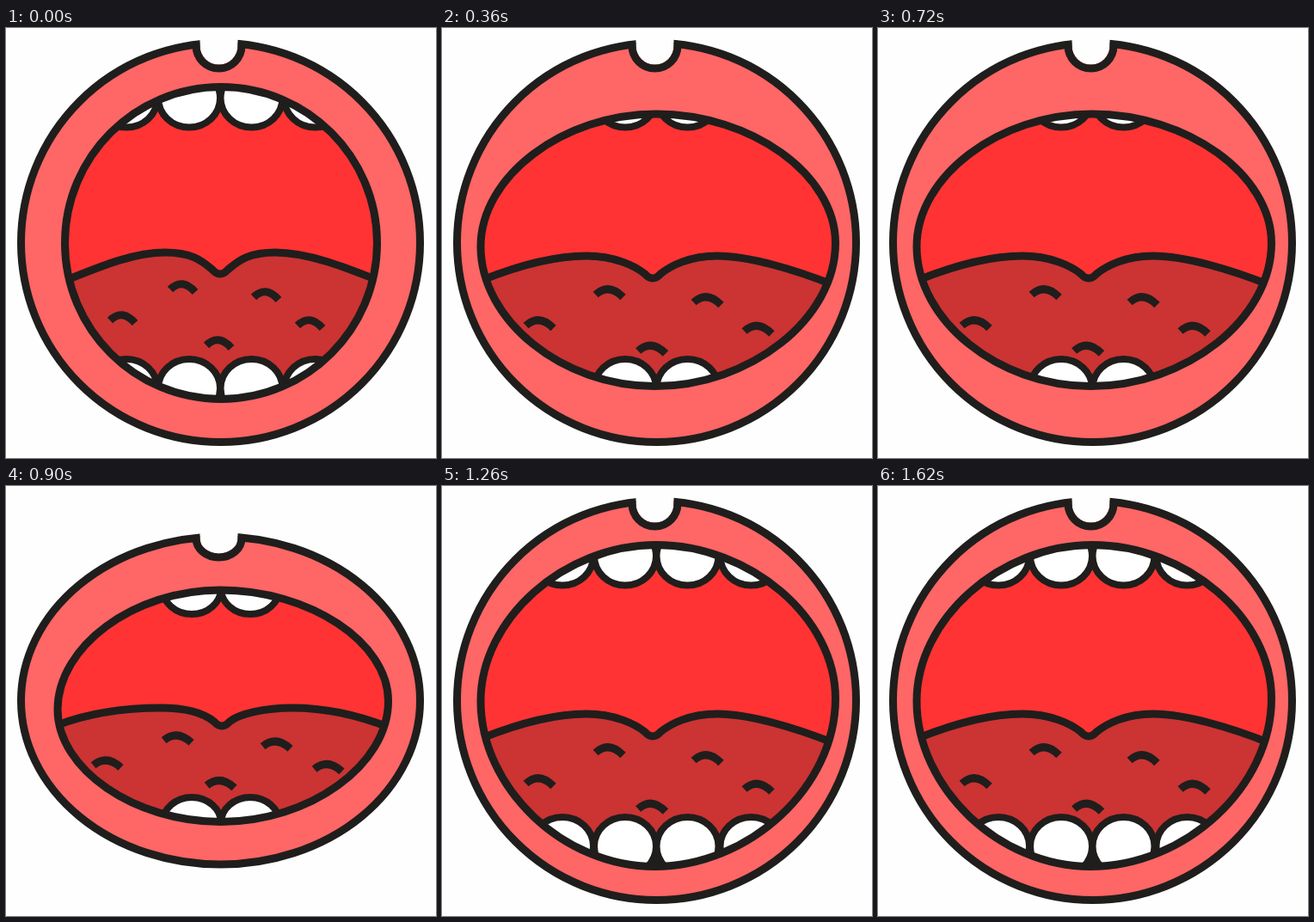
An HTML page that plays this animation: 500x500 px, repeating every 1.8 s.

```html
<!DOCTYPE html>
<html lang="en">
<head>
<meta charset="utf-8">
<title>Mouth</title>
<style>
  html, body { margin: 0; width: 100%; height: 100%; overflow: hidden; background: #fefefe; }
  svg { display: block; width: 100%; height: 100%; }
  .pose { visibility: hidden; animation: 1.8s step-end infinite; }
  .line { fill: none; stroke: #1f1e1c; stroke-width: 9; }
  .gap { fill: none; stroke: #1f1e1c; stroke-width: 12; }
  .tooth { fill: #fff; stroke: #1f1e1c; stroke-width: 8; }
  .lip { fill: #f66; }
  .throat { fill: #f33; }
  .tongue { fill: #c33; }
  .notch { fill: #fefefe; }

  #round { animation-name: round; }
  #wide { animation-name: wide; }
  #oval { animation-name: oval; }
  #flat { animation-name: flat; }
  @keyframes round { 0%, 60% { visibility: visible } 10%, 70%, 100% { visibility: hidden } }
  @keyframes wide { 0%, 20%, 80% { visibility: hidden } 10%, 70%, 90%, 100% { visibility: visible } }
  @keyframes oval { 0%, 30%, 50%, 100% { visibility: hidden } 20%, 40% { visibility: visible } }
  @keyframes flat { 0%, 40%, 60%, 90%, 100% { visibility: hidden } 30%, 50%, 80% { visibility: visible } }
</style>
</head>
<body>
<svg id="stage" viewBox="0 0 500 500"></svg>
<script>
// Lip outline radius and the dent in its upper edge
const tall = { ry: 232, top: 14, dentY: 20.6, dentRy: 26.5 };
const squat = { ry: 190.5, top: 55, dentY: 61, dentRy: 22 };

// Teeth: column centres, radii, and the y of the upper and lower rows
const bigTeeth = { xs: [140, 213, 285.5, 359.5], rx: 36, ry: 34, upper: 81.5, lower: 419 };
const frontTeeth = { ...bigTeeth, xs: [213, 285.5] };
const flatTeeth = { xs: [216, 284], rx: 34, ry: 30, upper: 119, lower: 392 };

// Tongue: [x, y] of left end, left hump, dip, right hump, right end
const wideTongue = {
  edge: [[47, 293], [168, 265], [245, 291], [320, 265], [453, 298]],
  bumps: [[113, 343], [194, 307], [308, 316], [367, 349.5], [243.5, 372.5]],
  bumpScale: [1.1, 1]
};
const roundTongue = {
  edge: [[68, 294], [185, 261], [249, 286], [313, 261], [434, 294]],
  bumps: [[135, 337], [205, 301], [302, 310], [353, 343], [247, 366]],
  bumpScale: [1, 1]
};
const flatTongue = {
  edge: [[56, 279.5], [180, 258], [251, 279], [333, 258], [446, 281]],
  bumps: [[117, 322], [199, 293], [314, 300], [374, 326.5], [249, 345.5]],
  bumpScale: [1.1, 0.9]
};

// Mouth opening: extreme points, and how full the corners between them are
const poses = {
  round: {
    lip: tall, teeth: bigTeeth, tongue: roundTongue,
    mouth: { left: [68.5, 250], top: [250, 68.5], right: [431.5, 250], bottom: [250, 431.5], fullness: 0.552 }
  },
  wide: {
    lip: tall, teeth: bigTeeth, tongue: wideTongue,
    mouth: { left: [45, 250], top: [249, 68.5], right: [457.5, 247], bottom: [247, 442.5], fullness: 0.525 }
  },
  oval: {
    lip: tall, teeth: frontTeeth, tongue: wideTongue,
    mouth: { left: [45, 254], top: [249, 100], right: [457.5, 250], bottom: [247, 416.5], fullness: 0.53 }
  },
  flat: {
    lip: squat, teeth: flatTeeth, tongue: flatTongue,
    mouth: { left: [60, 260], top: [249, 121], right: [444.5, 250], bottom: [250, 390.5], fullness: 0.53 }
  }
};

const path = (cls, d) => `<path class="${cls}" d="${d}"/>`;
const oval = (cls, cx, cy, rx, ry) => `<ellipse class="${cls}" cx="${cx}" cy="${cy}" rx="${rx}" ry="${ry}"/>`;

function mouthPath({ left, top, right, bottom, fullness: k }) {
  const mix = (a, b) => a + (b - a) * k;
  // Quarter curves between a side point (vertical tangent) and an end point (horizontal tangent)
  const sideToEnd = (s, e) => `C${s[0]} ${mix(s[1], e[1])} ${mix(e[0], s[0])} ${e[1]} ${e}`;
  const endToSide = (e, s) => `C${mix(e[0], s[0])} ${e[1]} ${s[0]} ${mix(s[1], e[1])} ${s}`;
  return `M${left}` + sideToEnd(left, top) + endToSide(top, right) +
    sideToEnd(right, bottom) + endToSide(bottom, left) + "Z";
}

function tonguePath([[x0, y0], [x1, y1], [x2, y2], [x3, y3], [x4, y4]]) {
  const shoulder = y2 - 5;
  return `M${x0} ${y0}C${x0 + 40} ${y0 - 16} ${x1 - 38} ${y1} ${x1} ${y1}` +
    `C${x1 + 33} ${y1} ${x2 - 20} ${shoulder - 9} ${x2 - 9} ${shoulder}` +
    `Q${x2} ${y2 + 5} ${x2 + 9} ${shoulder}` +
    `C${x2 + 20} ${shoulder - 9} ${x3 - 33} ${y3} ${x3} ${y3}` +
    `C${x3 + 38} ${y3} ${x4 - 40} ${y4 - 16} ${x4} ${y4}`;
}

function drawTongue({ edge, bumps, bumpScale: [sx, sy] }) {
  const d = tonguePath(edge);
  const bump = ([x, y]) =>
    path("line", `M${x - 14 * sx} ${y + 3 * sy}Q${x} ${y - 11 * sy} ${x + 15 * sx} ${y + 6 * sy}`);
  return path("tongue", d + "V500H0Z") + path("line", d) + bumps.map(bump).join("");
}

function drawTeeth({ xs, rx, ry, upper, lower }) {
  const gaps = xs.slice(1).map((x, i) => {
    const mid = (x + xs[i]) / 2;
    return path("gap", `M${mid} ${upper}v${-ry}M${mid} ${lower}v${ry}`);
  });
  const teeth = xs.map(x => oval("tooth", x, upper, rx, ry) + oval("tooth", x, lower, rx, ry));
  return gaps.concat(teeth).join("");
}

function drawLip({ ry, top, dentY, dentRy }) {
  return oval("lip", 249.5, 249.5, 232, ry) + oval("line", 249.5, 249.5, 232, ry) +
    path("notch", `M225.5 0H269.5V${dentY}A22 ${dentRy - 4.5} 0 0 1 225.5 ${dentY}Z`) +
    path("line", `M221 ${top + 3}V${dentY}A26.5 ${dentRy} 0 0 0 274 ${dentY}V${top + 3}`);
}

function drawPose([name, { lip, mouth, teeth, tongue }]) {
  const opening = mouthPath(mouth);
  return `<clipPath id="${name}-clip"><path d="${opening}"/></clipPath>
    <g class="pose" id="${name}">${drawLip(lip)}
      <g clip-path="url(#${name}-clip)">${path("throat", opening)}${drawTongue(tongue)}${drawTeeth(teeth)}</g>
      ${path("line", opening)}
    </g>`;
}

document.getElementById("stage").innerHTML = Object.entries(poses).map(drawPose).join("");
</script>
</body>
</html>
```
